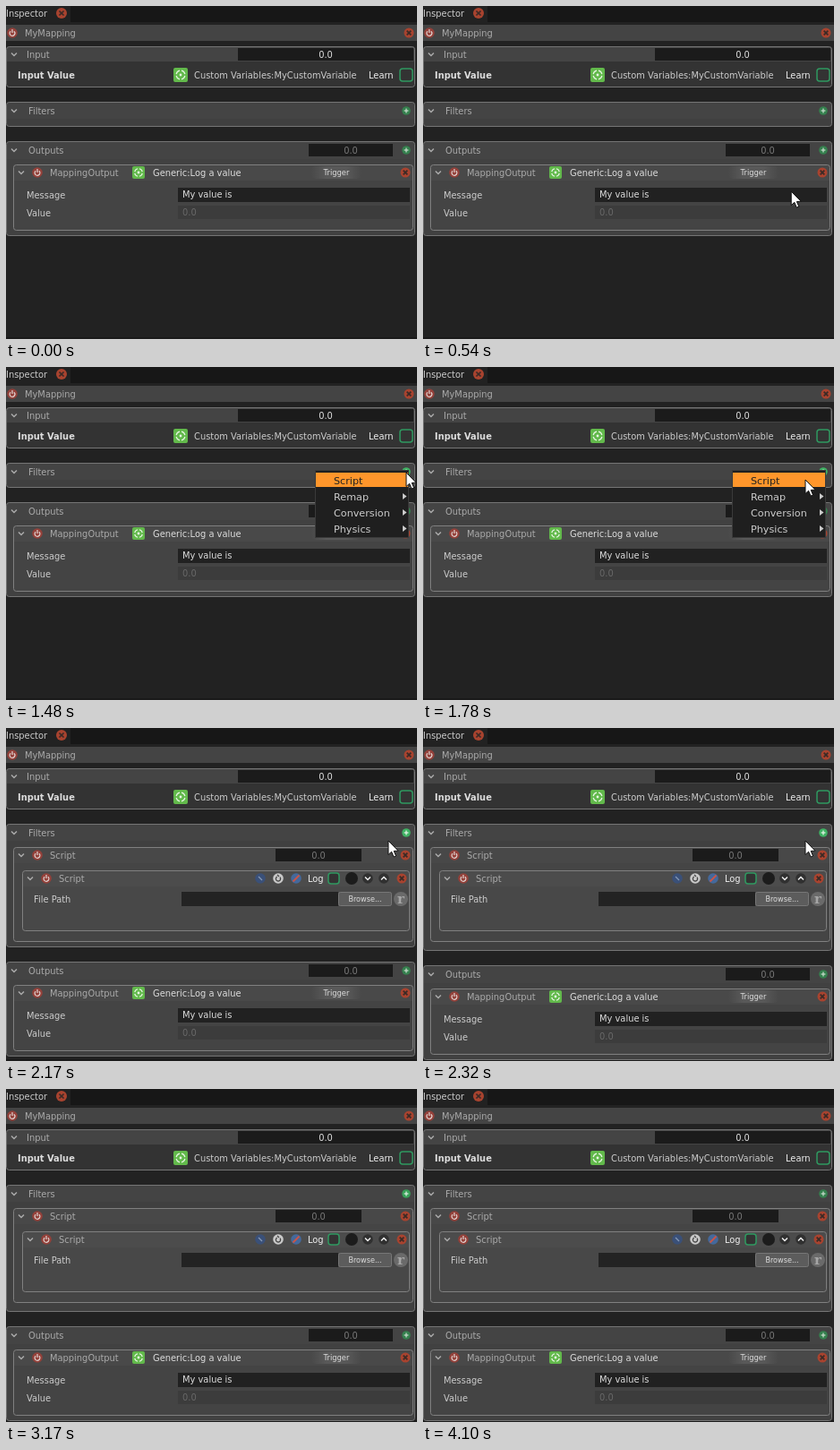
An HTML page with a canvas for the animation above (4.19 s loop, 459x372 px).

```html
<!DOCTYPE html>
<html lang="en">
<head>
<meta charset="utf-8">
<title>Inspector</title>
<style>
html, body { margin: 0; width: 100%; height: 100%; overflow: hidden; background: #222; }
canvas { display: block; width: 459px; height: 372px; }
</style>
</head>
<body>
<canvas id="stage" width="459" height="372"></canvas>
<script>
const g = document.getElementById('stage').getContext('2d');
const LOOP = 4190;
const SANS = '"DejaVu Sans", Verdana, sans-serif';

function text(str, x, y, color = '#bbb', { size = 9.9, weight = '', align = 'left' } = {}) {
  g.font = `${weight} ${size}px ${SANS}`;
  g.textAlign = align;
  g.fillStyle = color;
  g.fillText(str, x, y);
}

function rect(x, y, w, h, color) {
  g.fillStyle = color;
  g.fillRect(x, y, w, h);
}

function round(x, y, w, h, r, fill, stroke, width = 1) {
  g.beginPath();
  g.roundRect(x, y, w, h, r);
  if (fill) { g.fillStyle = fill; g.fill(); }
  if (stroke) { g.strokeStyle = stroke; g.lineWidth = width; g.stroke(); }
}

function disc(x, y, r, color) {
  g.beginPath();
  g.arc(x, y, r, 0, Math.PI * 2);
  g.fillStyle = color;
  g.fill();
}

function line(color, width, ...pts) {
  g.beginPath();
  for (let i = 0; i < pts.length; i += 2) g.lineTo(pts[i], pts[i + 1]);
  g.strokeStyle = color;
  g.lineWidth = width;
  g.stroke();
}

function arc(x, y, r, from, to, color, width) {
  g.beginPath();
  g.arc(x, y, r, from, to);
  g.strokeStyle = color;
  g.lineWidth = width;
  g.stroke();
}

// Framed group with a lighter header strip
function panel(x, y, w, h, head, body, top, edge = '#757575') {
  round(x + .5, y + .5, w - 1, h - 1, 3, body);
  g.save();
  g.clip();
  rect(x, y, w, head, top);
  g.restore();
  round(x + .5, y + .5, w - 1, h - 1, 3, null, edge);
}

function chevron(x, y, color = '#aaa', dir = 1) {
  line(color, 1.5, x - 3, y - 1.5 * dir, x, y + 1.5 * dir, x + 3, y - 1.5 * dir);
}

function close(x, y, r = 5.5) {
  disc(x, y, r, '#a8432f');
  const d = r * .42;
  line('#3a2a26', 1.7, x - d, y - d, x + d, y + d);
  line('#3a2a26', 1.7, x - d, y + d, x + d, y - d);
}

function power(x, y) {
  disc(x, y, 5.8, '#94413a');
  arc(x, y + .4, 2.9, -Math.PI * .28, Math.PI * 1.28, '#e0d2d0', 1.2);
  line('#e0d2d0', 1.2, x, y - 4, x, y);
}

function plus(x, y, color, mark = '#c3d8c8') {
  disc(x, y, 4.8, color);
  line(mark, 1.3, x - 2.4, y, x + 2.4, y);
  line(mark, 1.3, x, y - 2.4, x, y + 2.4);
}

function target(x, y, s) {
  round(x, y, s, s, 2, '#62b94b');
  const c = s / 2;
  for (let i = 0; i < 4; i++) {
    const a = i * Math.PI / 2;
    arc(x + c, y + c, s * .31, a + .2, a + 1.37, '#e6f5e2', 1.2);
  }
  disc(x + c, y + c, 1.4, '#e6f5e2');
}

function number(x, y, w, color) {
  rect(x, y, w, 14, '#1b1b1b');
  text('0.0', x + w / 2, y + 11, color, { align: 'center' });
}

function checkbox(x, y, s) {
  round(x, y, s, s, 3, '#333', '#2f9960', 1.5);
}

function header() {
  rect(0, 0, 459, 372, '#222');
  rect(72, 0, 387, 18, '#171717');
  rect(0, 370, 459, 2, '#1a1a1a');
  text('Inspector', 0, 12, '#ccc');
  close(62, 8, 6);

  rect(0, 21, 459, 18, '#444');
  power(7, 30);
  text('MyMapping', 21, 34, '#aaa');
  close(450, 30);

  panel(0, 45, 457, 46, 17, '#333', '#444');
  chevron(9, 54);
  text('Input', 23, 58, '#aaa');
  number(259, 47, 196, '#ddd');
  text('Input Value', 13, 81, '#ddd', { weight: 'bold' });
  target(187, 69, 16);
  text('Custom Variables:MyCustomVariable', 210, 81, '#ccc');
  text('Learn', 405, 81, '#eee');
  checkbox(440, 70, 14);
}

function filters(h, plusColor, mark) {
  panel(0, 107, 457, h, 19, '#404040', '#444');
  chevron(9, 117);
  text('Filters', 25, 121, '#aaa');
  plus(447, 117, plusColor, mark);
}

function script() {
  panel(8, 133, 447, 106, 18, '#454545', '#484848', '#808080');
  chevron(17, 142);
  power(35, 142);
  text('Script', 49, 146, '#aaa');
  number(301, 135, 96, '#777');
  close(446, 142);

  panel(18, 159, 433, 68, 18, '#484848', '#4c4c4c', '#808080');
  chevron(27, 168);
  power(45, 168);
  text('Script', 59, 172, '#aaa');

  disc(284, 168, 5.8, '#3a5078');
  line('#8597b5', 1.2, 282, 166, 286, 170);
  disc(304, 168, 5.8, '#c9c9c9');
  arc(304, 168.4, 2.6, -.7, 4.2, '#444', 1.3);
  line('#444', 1.3, 303, 164, 305, 166);
  disc(324, 168, 5.8, '#44699c');
  line('#c95548', 2, 320.5, 171.5, 327.5, 164.5);
  text('Log', 337, 172, '#eee');
  checkbox(360, 162, 12);
  disc(386, 168, 7, '#1c1c1c');
  disc(404, 168, 5.8, '#303030');
  chevron(404, 168, '#eee');
  disc(422, 168, 5.8, '#303030');
  chevron(422, 168, '#eee', -1);
  close(442, 168);

  text('File Path', 31, 195, '#ccc');
  rect(196, 183, 175, 16, '#232323');
  round(371.5, 183.5, 59, 15, 2, '#5c5c5c', '#777');
  text('Browse...', 401, 194, '#ddd', { size: 8.1, align: 'center' });
  disc(441, 191, 8, '#6a6a6a');
  g.font = 'bold 15px "DejaVu Serif", "Noto Serif", serif';
  g.textAlign = 'center';
  g.fillStyle = '#a5a5a5';
  g.fillText('r', 441, 196);
}

function outputs(dy) {
  g.save();
  g.translate(0, dy);
  panel(0, 151, 457, 106, 20, '#414141', '#444');
  chevron(9, 161);
  text('Outputs', 25, 165, '#aaa');
  number(338, 154, 94, '#777');
  plus(447, 161, '#35804e');

  panel(8, 177, 447, 74, 18, '#444', '#494949', '#808080');
  chevron(17, 186);
  power(35, 186);
  text('MappingOutput', 49, 190, '#aaa');
  target(141, 179, 14);
  text('Generic:Log a value', 164, 190, '#ddd');
  const shade = g.createLinearGradient(341, 0, 397, 0);
  shade.addColorStop(0, '#494949');
  shade.addColorStop(.3, '#595959');
  shade.addColorStop(.7, '#595959');
  shade.addColorStop(1, '#494949');
  round(341, 179, 56, 14, 5, shade);
  text('Trigger', 369, 189, '#ddd', { size: 8.4, align: 'center' });
  close(446, 186);

  text('Message', 23, 215, '#ccc');
  rect(192, 203, 259, 16, '#212121');
  text('My value is', 197, 214, '#ddd');
  text('Value', 23, 235, '#ccc');
  rect(192, 223, 259, 15, '#3c3c3c');
  text('0.0', 197, 234, '#686868');
  g.restore();
}

function menu(hot) {
  rect(345, 115, 105, 76, '#3a3a3a');
  rect(346, 116, 103, 74, '#1f1f1f');
  if (hot) rect(346, 118, 103, 16, '#ff962b');
  ['Script', 'Remap', 'Conversion', 'Physics'].forEach((name, i) => {
    const y = 131 + i * 18;
    text(name, 366, y, hot && !i ? '#222' : '#ccc', { size: 11.2 });
    if (!i) return;
    g.beginPath();
    g.moveTo(443, y - 8);
    g.lineTo(447.5, y - 4.5);
    g.lineTo(443, y - 1);
    g.fillStyle = '#ccc';
    g.fill();
  });
}

function cursor(x, y) {
  const pts = [0, 0, 0, 15.5, 3.6, 12.2, 6, 18, 8.6, 17, 6.2, 11.4, 11, 11.2];
  g.beginPath();
  for (let i = 0; i < pts.length; i += 2) g.lineTo(x + pts[i], y + pts[i + 1]);
  g.closePath();
  g.fillStyle = '#fff';
  g.fill();
  g.strokeStyle = '#111';
  g.lineWidth = 1;
  g.stroke();
}

// Pointer strokes: start, end, number of steps, quadratic curve
const moves = [
  { a: 150, b: 630, n: 7, p: [369, 364, 398, 232, 435, 143] },
  { a: 710, b: 860, n: 3, p: [439, 135, 445, 124, 450, 115] },
  { a: 1480, b: 1780, n: 5, p: [447, 118, 437, 126, 427, 126] },
  { a: 2490, b: 3010, n: 8, p: [425, 131, 381, 215, 421, 341] },
  { a: 3090, b: 3170, n: 2, p: [421, 357, 421, 368, 421, 380] }
];

function pointer(t) {
  const m = moves.filter(v => t >= v.a).pop();
  if (!m) return null;
  const last = m.n - 1;
  const k = Math.min(last, Math.floor((t - m.a) / (m.b - m.a) * last + .05)) / last;
  const q = 1 - k, [x0, y0, x1, y1, x2, y2] = m.p;
  return [q * q * x0 + 2 * q * k * x1 + k * k * x2,
          q * q * y0 + 2 * q * k * y1 + k * k * y2];
}

function plusLook(t) {
  if (t >= 1090 && t < 1170) return ['#c4ead0', '#fff'];
  if (t >= 860 && t < 2490) return ['#3fb163', '#e0f2e4'];
  if (t >= 2490 && t < 4100) return ['#38a058', '#d6ecdc'];
  return ['#35804e', '#c3d8c8'];
}

function draw(t) {
  const open = t >= 2170;
  const settle = t >= 2240 ? 4 : 0;
  header();
  filters(open ? 138 + settle : 28, ...plusLook(t));
  if (open) script();
  outputs(open ? 110 + settle : 0);
  if (t >= 1170 && !open) menu(t >= 1480);
  const at = pointer(t);
  if (at) cursor(...at);
}

const start = performance.now();
function tick() {
  draw((performance.now() - start) % LOOP);
  requestAnimationFrame(tick);
}
draw(0);
requestAnimationFrame(tick);
</script>
</body>
</html>
```
